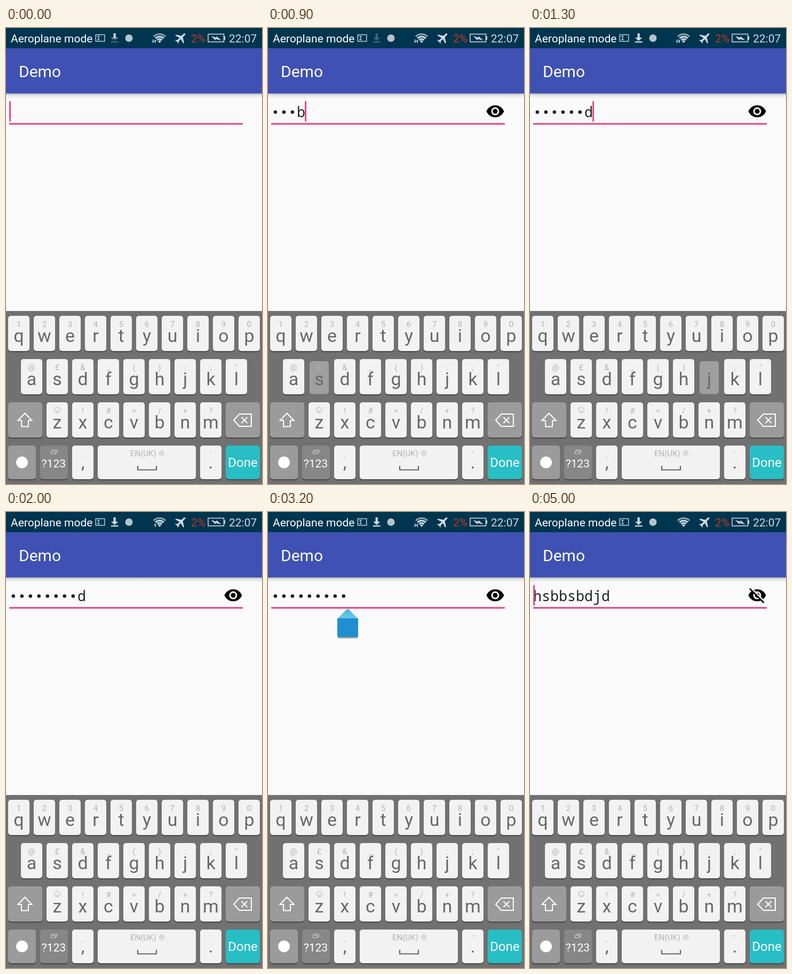
These frames come from a looping animation (480x854 px, 5.1 s). An HTML page:

```html
<!DOCTYPE html>
<html lang="en">
<head>
<meta charset="utf-8">
<title>Password field demo</title>
<style>
html, body { margin: 0; width: 100%; height: 100%; overflow: hidden; background: #fafafa; }
svg { display: block; width: 480px; height: 854px; font-family: Roboto, sans-serif; }
.mid { text-anchor: middle; }
.letter { font-size: 34px; fill: #686868; }
.hint { font-size: 15px; fill: #b2b2b2; }
.mono { font: 26.67px "Noto Sans Mono", monospace; fill: #212121; }
</style>
</head>
<body>
<svg viewBox="0 0 480 854">
  <defs>
    <linearGradient id="drop" x2="0" y2="1">
      <stop offset="0" stop-color="#000" stop-opacity=".32"/>
      <stop offset=".35" stop-color="#000" stop-opacity=".1"/>
      <stop offset="1" stop-color="#000" stop-opacity="0"/>
    </linearGradient>
    <linearGradient id="tip" x2="0" y2="1">
      <stop offset="0" stop-color="#4fb5dd"/>
      <stop offset="1" stop-color="#6acbe8"/>
    </linearGradient>
    <clipPath id="fill"><rect id="level" x="195" y="8" width="20" height="0"/></clipPath>
    <path id="arrow" d="M201.7 10h4v8h4.5l-6.5 6.3-6.5-6.3h4.5zM197 25h13.5v2.2H197z"/>
    <path id="eye" fill-rule="evenodd" d="M12 4.5C7 4.5 2.73 7.61 1 12c1.73 4.39 6 7.5 11 7.5s9.27-3.11 11-7.5C21.27 7.61 17 4.5 12 4.5zM12 17a5 5 0 1 1 0-10 5 5 0 0 1 0 10zM12 9a3 3 0 1 0 0 6 3 3 0 0 0 0-6z"/>
  </defs>

  <rect width="480" height="854" fill="#fafafa"/>
  <rect y="122" width="480" height="10" fill="url(#drop)"/>
  <rect y="38" width="480" height="84.5" fill="#3f51b3"/>
  <text x="24" y="92" font-size="30" fill="#fff">Demo</text>

  <rect width="480" height="38" fill="#003550"/>
  <g font-size="21">
    <text x="9" y="27" fill="#fff">Aeroplane mode</text>
    <text x="347" y="27" fill="#b93a20">2%</text>
    <text x="418" y="27" fill="#d3dce1">22:07</text>
  </g>
  <g fill="none" stroke="#b4c4cc" stroke-width="1.6">
    <rect x="168.3" y="12.5" width="16.5" height="12.5"/>
    <path d="M171 15.5h5M173.500 15.500v6.500M171 22h5"/>
  </g>
  <use href="#arrow" fill="#3f667b"/>
  <use href="#arrow" fill="#cfdae0" clip-path="url(#fill)"/>
  <circle cx="230.500" cy="19" r="7" fill="#b4c4cc"/>
  <g id="wifi" fill="none" stroke="#c9d5db" stroke-width="3.2"></g>
  <path id="down" d="M275 21.500h1.600v3.500h1.400l-2.200 3-2.200-3h1.400z" fill="#c9d5db"/>
  <path id="up" d="M279 28h1.600v-3.500h1.400l-2.200-3-2.200 3h1.400z" fill="#c9d5db"/>
  <path transform="translate(327.500 18.800) rotate(45) scale(1.12) translate(-11.500 -12.500)" fill="#d3dce1"
    d="M21 16v-2l-8-5V3.500a1.500 1.500 0 0 0-3 0V9l-8 5v2l8-2.500V19l-2 1.500V22l3.500-1 3.500 1v-1.500L13 19v-5.500z"/>
  <rect x="379" y="11.500" width="29.500" height="14.500" fill="none" stroke="#c9d5db" stroke-width="1.600"/>
  <path d="M409 15.500h2v6.500h-2zM384.500 15l10 3.200v-3l9 8-10.500-2.700v2.800z" fill="#d3dce1"/>

  <rect x="6" y="178" width="438" height="3" fill="#f3447f"/>
  <g id="dots" fill="#212121"></g>
  <text id="text" class="mono" y="167"></text>
  <rect id="cursor" y="137" width="3" height="38" fill="#e84a84"/>
  <g id="icon" transform="translate(408 138) scale(1.5)">
    <use href="#eye"/>
    <g id="slash" stroke-width="1.800">
      <path d="M3.900 2.400l17.700 17.700" stroke="#fafafa"/>
      <path d="M2.640 3.640l17.720 17.720" stroke="#000"/>
    </g>
  </g>
  <g id="handle">
    <rect x="130" y="201" width="39" height="36.500" rx="4" fill="#000" opacity=".13"/>
    <rect x="130" y="201" width="39" height="35" rx="4" fill="#000" opacity=".3"/>
    <path d="M130.500 199.500L147 183q2.500-3 5 0l16.500 16.500z" fill="url(#tip)"/>
    <path d="M130 199h39v32q0 3-3 3h-33q-3 0-3-3z" fill="#1f8fd0"/>
  </g>

  <rect y="530" width="480" height="324" fill="#717171"/>
  <g id="keys"></g>
  <g fill="none" stroke="#fff" stroke-width="2">
    <path d="M35.500 721.500l13 13.500h-6.500v11.500h-13V735h-6.500z"/>
    <path d="M437.500 723h22.500v23h-22.500L427 734.500zM441.500 729l11 11m0-11l-11 11"/>
  </g>
  <circle cx="30" cy="813.500" r="11" fill="#fff"/>
  <g fill="none" stroke="#d0d0d0" stroke-width="1.200">
    <path d="M84.500 793h8v4.500h-8zM87 793v-2.500h8.500v4.500H92.500"/>
  </g>
  <text class="mid" x="89.500" y="823" font-size="21" fill="#fff">?123</text>
  <text class="hint" x="233" y="802" font-size="14.500">EN(UK)</text>
  <g fill="none" stroke="#b2b2b2">
    <circle cx="292" cy="796.500" r="4.600"/>
    <circle cx="292" cy="796" r="2"/>
    <circle cx="96" cy="715.500" r="5.500"/>
    <path d="M93 717q3 3.500 6 0M94 713v1.500M98 713v1.500"/>
  </g>
  <path d="M247 820v7.500h35V820" fill="none" stroke="#666" stroke-width="2.200"/>
  <text class="mid" x="444" y="822" font-size="24" fill="#fff">Done</text>
</svg>
<script>
const LOOP = 5100, STEP = 100, PITCH = 16, LEFT = 6;
const WORD = 'hsbbsbdjd';
const REVEAL = 3600;
const typedAt = [600, 700, 800, 900, 1000, 1100, 1200, 1400, 1500];
const pressedAt = { 500: 'h', 600: 's', 700: 'b', 800: 'b', 900: 's', 1000: 'b', 1100: 'd', 1300: 'j', 1400: 'd' };
const cursorOff = [[2000, 2500], [3000, REVEAL], [4100, 4600]];
const handleShown = [2900, REVEAL];
// Filled height of the download arrow, one entry per step
const levels = [11, 20, 20, 0, 0, 6];

const $ = id => document.getElementById(id);
const within = (t, [a, b]) => t >= a && t < b;
const show = (el, on) => el.setAttribute('visibility', on ? 'visible' : 'hidden');

const box = (x, y, w, h, fill, extra = '') =>
  `<rect x="${x}" y="${y}" width="${w}" height="${h}" rx="5" fill="${fill}" ${extra}/>`;

const label = (cls, x, y, s) =>
  `<text class="mid ${cls}" x="${x}" y="${y}">${s.replace('&', '&amp;')}</text>`;

function plate(x, y, w, h, fill) {
  return box(x, y + 3, w, h, '#000', 'opacity=".12"') +
    box(x, y + 1.500, w, h, '#000', 'opacity=".3"') + box(x, y, w, h, fill);
}

function letterKey(ch, hint, x, y) {
  return `<g id="key-${ch}"><g class="up">${plate(x, y, 40, 66, '#f2f2f2')}</g>` +
    `<g class="down" visibility="hidden">${box(x + 2, y + 4, 36, 61.500, '#9f9f9f')}</g>` +
    label('hint', x + 20, y + 21, hint) + label('letter', x + 20, y + 49, ch) + '</g>';
}

function buildKeys() {
  const rows = [
    ['qwertyuiop', '1234567890', 4, 539],
    ['asdfghjkl', '@£&_():;"', 28, 620],
    ['zxcvbnm', ' !#=/+?', 76, 701]
  ];
  const letters = rows.map(([chars, hints, x, y]) =>
    [...chars].map((ch, i) => letterKey(ch, hints[i], x + 48 * i, y)).join('')).join('');
  const gray = '#9b9b9b', light = '#f2f2f2';
  const others = [
    [4, 701, 64, 66, gray], [412, 701, 64, 66, gray],
    [4, 782, 52, 63, gray], [64, 782, 52, 63, '#878787'],
    [124, 782, 40, 63, light], [172, 782, 184, 63, light],
    [364, 782, 40, 63, light], [412, 782, 64, 63, '#27bec5']
  ].map(k => plate(...k)).join('');
  $('keys').innerHTML = letters + others +
    label('letter', 144, 825, ',') + label('letter', 384, 825, '.') +
    label('hint', 144, 809, '-') + label('hint', 384, 803, "'");
}

function buildWifi() {
  const arc = (r, color) => {
    const d = r * Math.SQRT1_2;
    return `<path d="M${288 - d} ${27 - d}A${r} ${r} 0 0 1 ${288 + d} ${27 - d}" stroke="${color}"/>`;
  };
  $('wifi').innerHTML = arc(15.500, '#8ba2ae') + arc(10.800, '#c9d5db') + arc(6.300, '#c9d5db') +
    '<path d="M288 28l-3.200-3.500q3.200-2.500 6.400 0z" fill="#c9d5db" stroke="none"/>';
}

function setKey(ch, down) {
  const key = $('key-' + ch);
  show(key.querySelector('.up'), !down);
  show(key.querySelector('.down'), down);
}

let lastTime = -1;
function draw(t) {
  if (t === lastTime) return;
  lastTime = t;
  const count = typedAt.filter(at => at <= t).length;
  const open = t >= REVEAL;
  // The newest letter stays readable for a moment before it is masked
  const fresh = count && t < typedAt[count - 1] + 1400;
  const hidden = open ? 0 : count - (fresh ? 1 : 0);

  dots.forEach((dot, i) => show(dot, i < hidden));
  $('text').setAttribute('x', LEFT + PITCH * hidden);
  $('text').textContent = WORD.slice(hidden, count);
  $('cursor').setAttribute('x', Math.max(LEFT, LEFT - 1 + PITCH * (open ? 0 : count)));
  show($('cursor'), !cursorOff.some(span => within(t, span)));

  $('icon').style.display = count ? '' : 'none';
  $('slash').style.display = open ? '' : 'none';
  show($('handle'), within(t, handleShown));

  for (const ch of new Set(WORD)) setKey(ch, pressedAt[t] === ch);

  $('level').setAttribute('height', levels[t / STEP % levels.length]);
  show($('down'), !open && !within(t, [1700, 2300]));
  show($('up'), !open);
}

buildKeys();
buildWifi();
$('dots').innerHTML = [...WORD].map((_, i) =>
  `<circle cx="${LEFT + 7.800 + PITCH * i}" cy="157.500" r="3.300"/>`).join('');
const dots = [...$('dots').children];

const start = performance.now();
function tick() {
  const t = (performance.now() - start) % LOOP;
  draw(Math.floor(t / STEP) * STEP);
  requestAnimationFrame(tick);
}
draw(0);
requestAnimationFrame(tick);
</script>
</body>
</html>
```
